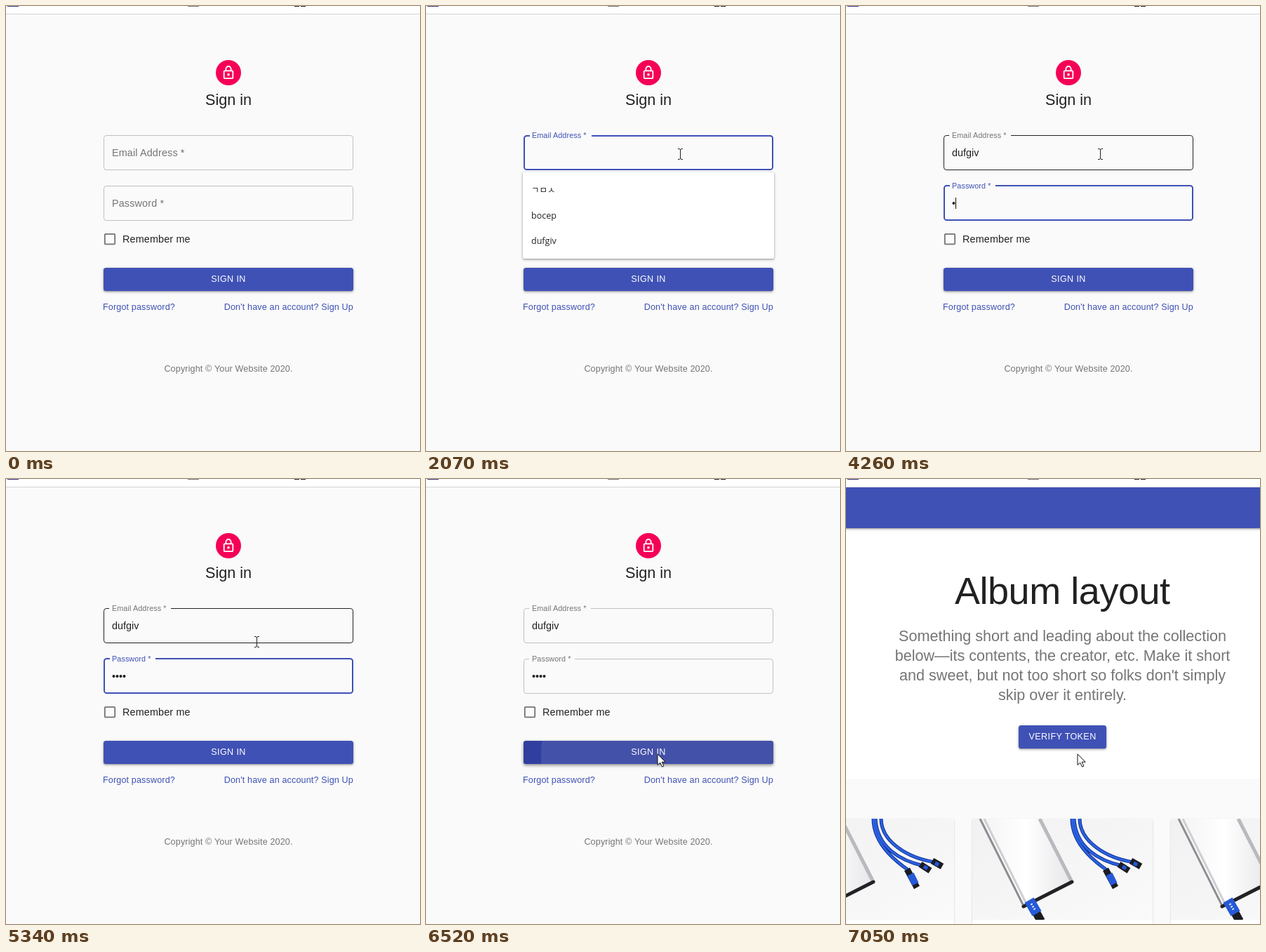
Write an HTML page that moves like this. It is 590 px wide and 634 px high and loops after 8000 ms.

```html
<!DOCTYPE html>
<html lang="en">
<head>
<meta charset="utf-8">
<title>Sign in</title>
<style>
  html, body { margin: 0; width: 100%; height: 100%; overflow: hidden; background: #fafafa; }
  svg { display: block; }
  text { font-family: "Liberation Sans", Arial, sans-serif; fill: rgba(0, 0, 0, .87); white-space: pre; }
  .body { font-size: 14.4px; letter-spacing: .135px; }
  .small { font-size: 12.6px; letter-spacing: .135px; }
  .heading { font-size: 21.6px; }
  .title { font-size: 54px; letter-spacing: -.45px; }
  .button { font-size: 12.6px; letter-spacing: .36px; fill: #fff; }
  .value { font-size: 14.4px; }
  .option { font: 12.5px "Open Sans", "Noto Sans CJK KR", "Noto Sans CJK", sans-serif; fill: #222; }
  .mid { text-anchor: middle; }
  .end { text-anchor: end; }
  .grey { fill: #757575; }
  .indigo { fill: #3f51b5; }
  .raised { filter: drop-shadow(0 1px 1px rgba(0, 0, 0, .3)) drop-shadow(0 1px 2px rgba(0, 0, 0, .2)); }
  .card { fill: #fff; filter: drop-shadow(0 1px 1px rgba(0, 0, 0, .2)); }
</style>
</head>
<body>
<svg width="590" height="634" viewBox="0 0 590 634">
  <defs>
    <linearGradient id="backdrop" x2="1" y2="1"><stop stop-color="#f1f1f2"/><stop offset="1" stop-color="#fafafa"/></linearGradient>
    <linearGradient id="metal" x2="1"><stop stop-color="#f3f3f4"/><stop offset=".5" stop-color="#fff"/><stop offset="1" stop-color="#e6e6e9"/></linearGradient>
    <clipPath id="buttonClip"><rect x="139" y="373" width="356" height="33" rx="3.6"/></clipPath>
    <clipPath id="photoClip"><rect width="257" height="144"/></clipPath>
    <g id="photo" clip-path="url(#photoClip)" fill="none">
      <path fill="url(#backdrop)" d="M0 0h257v144H0z"/>
      <path fill="url(#metal)" d="M10 0H97L143 88 72 126z"/>
      <path stroke="#8d8d92" stroke-width="3" d="M11 0 73 124"/>
      <path stroke="#cfcfd3" stroke-width="3" d="M17 0 77 121"/>
      <path stroke="#b9b9be" stroke-width="5" d="M96 0 141 88"/>
      <path stroke="#222226" stroke-width="5" stroke-linecap="round" d="M73 125 142 90"/>
      <g stroke="#12308f" stroke-width="5">
        <path id="cables" d="M142 0C142 30 165 55 193 74M145 0C147 42 182 60 213 67M153 0C153 32 190 56 230 62"/>
      </g>
      <use href="#cables" stroke="#2a62e2" stroke-width="3"/>
      <path stroke="#1b1b22" stroke-width="9" d="M190 72 204 98M209 65 223 74M226 60 240 68"/>
      <path stroke="#2559d8" stroke-width="10" d="M195 79 202 93"/>
      <path stroke="#2559d8" stroke-width="5" d="M214 68 219 71M230 63 235 66"/>
      <path stroke="#1b1b22" stroke-width="12" d="M88 128 98 146"/>
      <path stroke="#2559d8" stroke-width="15" d="M81 116 92 135"/>
      <path stroke="#dfe6fa" stroke-width="3" stroke-dasharray="2 2" d="M84 121 90 131"/>
    </g>
  </defs>

  <rect width="590" height="634" fill="#fafafa"/>

  <g id="signIn">
    <circle cx="317" cy="95" r="18" fill="#f50057"/>
    <g transform="translate(306.2 84.2) scale(.9)" fill="none" stroke="#fff" stroke-width="2">
      <rect x="5" y="9" width="14" height="12" rx="1"/>
      <path d="M8 9V6a4 4 0 0 1 8 0v3"/>
      <circle cx="12" cy="15" r="2" fill="#fff" stroke="none"/>
    </g>
    <text class="heading mid" x="317" y="141">Sign in</text>
    <g id="fields"></g>
    <rect x="140.8" y="324.9" width="14.4" height="14.4" rx="1" fill="none" stroke="#737373" stroke-width="1.8"/>
    <text class="body" x="166" y="337">Remember me</text>

    <rect id="submit" class="indigo" x="139" y="373" width="356" height="33" rx="3.6"/>
    <g clip-path="url(#buttonClip)">
      <rect id="submitHover" x="139" y="373" width="356" height="33" fill="#303f9f"/>
      <circle id="ripple" cx="330" cy="395" fill="#fff"/>
    </g>
    <text class="button mid" x="317" y="393">SIGN IN</text>
    <text class="small indigo" x="138" y="433">Forgot password?</text>
    <text class="small indigo end" x="495" y="433">Don't have an account? Sign Up</text>
    <text class="small grey mid" x="317" y="521">Copyright © Your Website 2020.</text>

    <g id="dropdown">
      <rect id="panel" class="raised" x="138" y="237" width="358" rx="2" fill="#fff"/>
      <g id="otherOptions">
        <text class="option" x="150" y="267">ㄱㅁㅅ</text>
        <text class="option" x="150" y="303">bocep</text>
      </g>
      <text id="match" class="option" x="150"></text>
    </g>
  </g>

  <g id="album">
    <path fill="#fff" d="M0 12h590v415H0z"/>
    <rect class="indigo raised" x="-9" y="11" width="608" height="59"/>
    <text class="title mid" x="308.3" y="178">Album layout</text>
    <g id="lead"></g>
    <rect class="indigo raised" x="246" y="351" width="125" height="33" rx="3.6"/>
    <text class="button mid" x="308.6" y="371">VERIFY TOKEN</text>
    <g id="cards"></g>
    <g id="photos"></g>
  </g>

  <g id="browserBar">
    <path fill="#fff" d="M0 0h590v11H0z"/>
    <path fill="#d4d4d6" d="M0 11h590v1H0z"/>
    <path fill="#353a86" d="M2 0h16v1H2z"/>
    <path fill="#77777f" d="M259 0h16v1h-16z"/>
    <path fill="#222" d="M411 0h7v1h-7zM420 0h7v1h-7z"/>
  </g>

  <g id="cursor">
    <path id="beam" fill="none" stroke="#222" d="M-3 -7.5h2l1.5 1 1.5 -1h2M-3 7.5h2l1.5 -1 1.5 1h2M.5 -7V7"/>
    <path id="hand" fill="#fff" stroke="#111" transform="translate(-5)" d="M5.5 14V2a1.6 1.6 0 0 1 3.2 0V8q1.6-1.2 2.6.6 1.6-.8 2.4.8 1.8-.3 1.8 1.6v5l-2 4v2.5H6v-2L1 13.5q-.6-2 1.2-2 1.5.4 3.3 2.5zM8.7 8v4M11.3 9v3M13.7 10v2"/>
    <path id="arrow" fill="#fff" stroke="#111" d="M0 .8V16.5l3.7-3.4 2.8 6 2.4-1.1-2.7-5.8h5z"/>
  </g>
</svg>
<script>
const LOOP = 8000;
const USER = "dufgiv";
const $ = id => document.getElementById(id);
const show = (node, on) => node.style.display = on ? "" : "none";
const set = (node, attrs) => { for (const k in attrs) node.setAttribute(k, attrs[k]); };
const clamp = v => Math.min(1, Math.max(0, v));
const within = (t, ...spans) => spans.some(([a, b]) => t >= a && t < b);
const countPast = (t, times) => times.filter(x => t >= x).length;

function add(parent, name, attrs = {}, content = "") {
  const node = document.createElementNS("http://www.w3.org/2000/svg", name);
  set(node, attrs);
  node.textContent = content;
  return parent.appendChild(node);
}

// cubic-bezier(x1, 0, .2, 1), solved by bisection
function ease(u, x1 = .4) {
  u = clamp(u);
  let lo = 0, hi = 1, s = .5;
  for (let i = 0; i < 20; i++) {
    s = (lo + hi) / 2;
    const x = 3 * s * (1 - s) ** 2 * x1 + 3 * s * s * (1 - s) * .2 + s ** 3;
    if (x < u) lo = s; else hi = s;
  }
  return s * s * (3 - 2 * s);
}

const bursts = [[0, 0, 1], [1070, 1220, 3], [1380, 1690, 5], [2070, 2070, 1], [2470, 2550, 2],
  [2850, 2850, 1], [3020, 3020, 1], [3170, 3250, 2], [3400, 3400, 1], [3620, 3790, 3],
  [4090, 4090, 1], [4260, 4260, 1], [4410, 4410, 1], [4560, 4560, 1], [4730, 4730, 1],
  [5280, 5880, 9], [6200, 6520, 5], [6590, 6590, 1], [7050, 7050, 1]];
const refreshes = bursts.flatMap(([a, b, n]) =>
  Array.from({ length: n }, (_, i) => a + (n > 1 ? (b - a) * i / (n - 1) : 0)));

const cursorPath = [[1070, 467, 291], [1220, 370, 257], [1380, 362, 211], [5200, 362, 211],
  [5350, 352, 250], [5500, 341, 345], [5640, 335, 424], [5880, 330, 391]];

function cursorAt(t) {
  const i = cursorPath.findIndex(p => p[0] > t);
  if (i < 0) return cursorPath.at(-1).slice(1);
  const [a, b] = [cursorPath[Math.max(0, i - 1)], cursorPath[i]];
  const u = clamp((t - a[0]) / (b[0] - a[0] || 1));
  return [1, 2].map(k => a[k] + (b[k] - a[k]) * u);
}

function makeField(label, top, focusTop, gapWidth) {
  const g = add($("fields"), "g");
  const border = add(g, "rect", { fill: "none", rx: 3.6 });
  const gap = add(g, "rect", { y: top - 2, height: 5, fill: "#fafafa" });
  const caption = add(g, "text", { class: "body" }, label);
  const value = add(g, "text", { class: "value", x: 151, y: top + 30 });
  const caret = add(g, "rect", { y: top + 17, width: 1, height: 16, fill: "#111" });

  return ({ text, focus, hover, shrink, caretOn }) => {
    const inset = focus ? 1 : .5, y = focus ? focusTop : top;
    set(border, {
      x: 139 + inset, y: y + inset, width: 356 - 2 * inset, height: top + 50 - y - 2 * inset,
      stroke: focus ? "#3f51b5" : hover ? "#212121" : "#c0c0c0", "stroke-width": 2 * inset
    });
    set(gap, { x: focus ? 148 : 147, width: gapWidth * shrink });
    set(caption, { transform: `translate(151 ${top + 30 - 26 * shrink}) scale(${1 - .25 * shrink})` });
    caption.style.fill = focus ? "#3f51b5" : "#757575";
    value.textContent = text;
    show(caret, caretOn);
    set(caret, { x: Math.floor(151 + (text ? value.getComputedTextLength() : 0)) });
  };
}

const drawEmail = makeField("Email Address *", 184, 184, 88);
const drawPassword = makeField("Password *", 256, 255, 65);
$("match").textContent = USER;

["Something short and leading about the collection",
 "below—its contents, the creator, etc. Make it short",
 "and sweet, but not too short so folks don't simply",
 "skip over it entirely."].forEach((line, i) =>
  add($("lead"), "text", { class: "heading grey mid", x: 308.5, y: 231 + 28 * i }, line));

for (const x of [-103, 180, 463]) {
  add($("cards"), "rect", { class: "card", x, y: 484, width: 257, height: 200, rx: 3.6 });
  add($("photos"), "use", { href: "#photo", transform: `translate(${x} 484)` });
}

function drawSignIn(t) {
  drawEmail({
    text: USER.slice(0, countPast(t, [2470, 2850, 3020, 3170, 3250, 3400])),
    focus: within(t, [1450, 3620]),
    hover: within(t, [1380, 5340]),
    shrink: ease((t - 1420) / 200, 0),
    caretOn: within(t, [1450, 2070], [2470, 3620])
  });
  drawPassword({
    text: "•".repeat(countPast(t, [4260, 4410, 4560, 4730])),
    focus: within(t, [3620, 6200]),
    shrink: ease((t - 3590) / 200, 0),
    caretOn: within(t, [3620, 4090], [4260, 5280], [5730, 6200])
  });

  const filtered = t >= 2550;
  show($("dropdown"), within(t, [1600, 3400]));
  show($("otherOptions"), !filtered);
  set($("panel"), { height: filtered ? 51 : 123 });
  set($("match"), { y: filtered ? 267 : 339 });

  const hover = ease((t - 5720) / 250);
  set($("submitHover"), { opacity: hover });
  $("submit").style.filter = `drop-shadow(0 ${1 + hover}px ${1 + hover}px rgba(0,0,0,.3)) drop-shadow(0 1px 2px rgba(0,0,0,.2))`;
  const grow = ease((t - 6200) / 550), fade = 1 - ease((t - 6290) / 550);
  set($("ripple"), { r: 193 * grow, opacity: t < 6200 ? 0 : (.1 + .2 * grow) * fade });
}

function draw(now) {
  const clock = now % LOOP;
  const t = refreshes.findLast(x => x <= clock);
  const onAlbum = t >= 6590;
  show($("signIn"), !onAlbum);
  show($("album"), onAlbum);
  show($("photos"), t >= 7050);
  if (!onAlbum) drawSignIn(t);

  const [x, y] = cursorAt(t).map(Math.round);
  const arrow = t >= 6430 || within(t, [5280, 5420]) && y > 234 && y < 256;
  const hand = !arrow && y > 372;
  show($("cursor"), t >= 1070);
  set($("cursor"), { transform: `translate(${x} ${y})` });
  show($("arrow"), arrow);
  show($("hand"), hand);
  show($("beam"), !arrow && !hand);
}

const start = performance.now();
(function frame() {
  draw(performance.now() - start);
  requestAnimationFrame(frame);
})();
</script>
</body>
</html>
```
